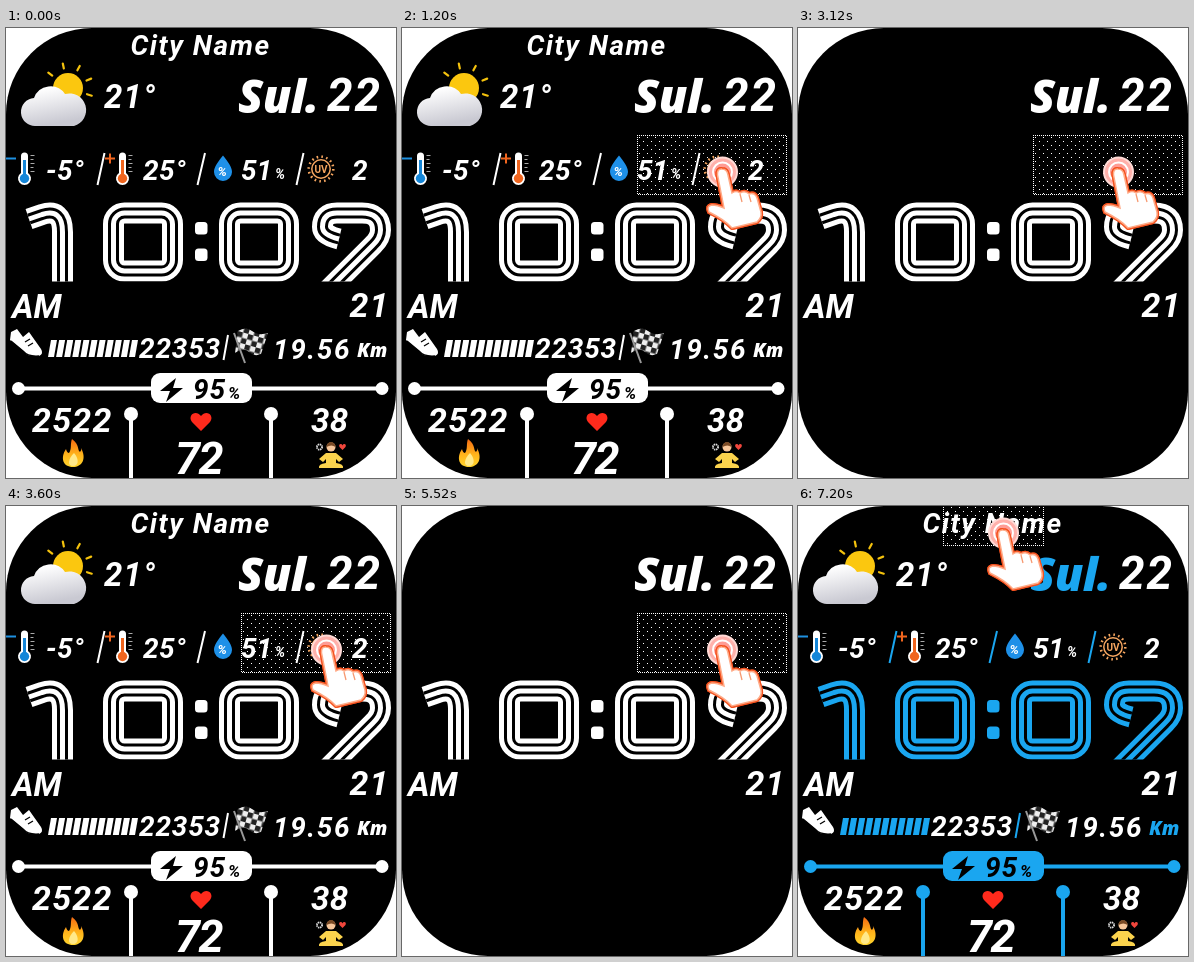
These frames come from a looping animation (390x450 px, 8 s). An HTML page:

```html
<!DOCTYPE html>
<html lang="en">
<head>
<meta charset="utf-8">
<title>Watch face</title>
<style>
  html, body { margin: 0; width: 100%; height: 100%; overflow: hidden; background: #fff; }
  svg { display: block; width: 390px; height: 450px; color: #fff; }
  text { font: italic 700 28px Roboto, sans-serif; fill: #fff; }
  .tint { fill: currentColor; }
  .dark { fill: #000; }
  .line { stroke: currentColor; fill: none; }
  .humanist { font-family: "Open Sans", sans-serif; font-weight: 800; }
</style>
</head>
<body>
<svg viewBox="0 0 390 450">
  <defs>
    <linearGradient id="cloud" x2=".3" y2="1">
      <stop offset=".15" stop-color="#fff"/><stop offset="1" stop-color="#c9c9d2"/>
    </linearGradient>
    <linearGradient id="fire" x2="0" y2="1">
      <stop stop-color="#f56a12"/><stop offset=".55" stop-color="#ffb31a"/><stop offset="1" stop-color="#ffd52e"/>
    </linearGradient>
    <pattern id="dots" width="8" height="8" patternUnits="userSpaceOnUse">
      <path d="M1 1h1v1h-1zM5 5h1v1h-1z" fill="#fff"/>
    </pattern>
    <pattern id="check" width="12" height="12" patternUnits="userSpaceOnUse" patternTransform="translate(232 303) rotate(16) scale(.9)">
      <path d="M0 0h12v12H0z" fill="#eee"/><path d="M0 0h6v6H0zM6 6h6v6H6z" fill="#222"/>
    </pattern>
    <clipPath id="timeClip"><path d="M0 170H390V253.500H0z"/></clipPath>
    <path id="one" d="M23 191L36 186.500Q56.500 180 56.500 204V258"/>
    <rect id="zero" x="107.500" y="185" width="59" height="58" rx="11"/>
    <path id="nine" d="M333 211Q316.500 207 316.500 199Q316.500 185 331 185H356Q374.500 185 374.500 202Q374.500 210 367 217L321 263"/>
    <g id="thermometer">
      <path d="M15 128a3.500 3.500 0 0 1 7 0v17a6.500 6.500 0 1 1-7 0z" fill="#fff"/>
      <circle cx="18.500" cy="150.500" r="4.700"/><path d="M17 132h3v18h-3z"/>
      <path d="M24.500 127.500h4m-4 4h3m-3 4h4m-4 4h3m-3 4h4" stroke="#aaa" stroke-width="1"/>
    </g>
  </defs>

  <rect width="390" height="450" rx="86"/>

  <g id="clock">
    <g id="time" clip-path="url(#timeClip)" fill="none"></g>
    <g class="tint">
      <rect x="189" y="194" width="12.500" height="12.500" rx="3.500"/>
      <rect x="189" y="220.500" width="12.500" height="12.500" rx="3.500"/>
    </g>
  </g>

  <g id="info">
    <g id="weather">
      <g id="rays" stroke="#f4c20d" stroke-width="2.200" stroke-linecap="round"></g>
      <circle cx="62" cy="60" r="15" fill="#fbc70f"/>
      <path d="M30 98a14 14 0 0 1-2-28A17.500 17.500 0 0 1 59 66A16.500 16.500 0 1 1 68 98Z" fill="url(#cloud)"/>
    </g>

    <use href="#thermometer" fill="#1486d8"/>
    <use href="#thermometer" x="98" fill="#f0651e"/>
    <path d="M0 130.500h10" stroke="#1e90e0" stroke-width="2"/>
    <path d="M99 130.500h10m-5-5v10" stroke="#f0651e" stroke-width="2"/>
    <path d="M217 127.500C222 134 226 139 226 144a9 9 0 0 1-18 0C208 139 212 134 217 127.500Z" fill="#1e90e8"/>
    <text x="211.500" y="148" style="font-size:13px">%</text>

    <g stroke="#f6a660" fill="none" stroke-width="1.500">
      <circle cx="315" cy="141" r="9.200"/>
      <circle cx="315" cy="141" r="12.300" stroke-width="2.500" stroke-dasharray="1.600 3.230"/>
    </g>
    <text x="315" y="145" text-anchor="middle" style="font:700 10px Roboto,sans-serif;fill:#f6a660">UV</text>

    <path class="line" stroke-width="2" d="M98.500 125L91.500 157M199 125L191.500 157M297.500 125L290.500 157M222 307L217.500 332"/>

    <path d="M5 304L11 301L17 309L23 304L35 321Q38 326 33 328H25Q20 327 16 322L4 312Z" fill="#fff"/>
    <path d="M5 313L17 323Q22 329 33 328M19 314l5-3m-2 7l5-3" stroke="#000" stroke-width="1.300" fill="none"/>
    <g id="steps" class="tint"></g>
    <path d="M232 303Q240 298 246 303T262 305L255 326Q248 329 243 324T229 325Z" fill="url(#check)"/>
    <path d="M228 305L239 335" stroke="#999" stroke-width="2"/>

    <path class="line" stroke-width="4" d="M13 360.500H376M125 386V450M265 386V450"/>
    <g class="tint">
      <circle cx="12.500" cy="360.500" r="6.500"/><circle cx="376" cy="360.500" r="6.500"/>
      <circle cx="125" cy="386" r="7"/><circle cx="265" cy="386" r="7"/>
      <rect x="145" y="345" width="101" height="30" rx="9"/>
    </g>
    <path d="M170 350L154 363H164L160 374L177 360H167Z"/>

    <path d="M195 403L186 394C181 387 190 381 195 388C200 381 209 387 204 394Z" fill="#ff2a1c"/>
    <path d="M66 411C74 417 71 422 74 424Q76 422 75 420C81 431 76 439 67 439C57 439 54 430 60 421Q61 425 63 425C66 421 64 416 66 411Z" fill="url(#fire)"/>
    <path d="M68 425C74 432 72 438 67 438C61 438 62 431 68 425Z" fill="#ffe98a"/>

    <g fill="#fbd34d">
      <circle cx="325" cy="419" r="4.500" fill="#f7c69a"/>
      <path d="M320.500 419a4.500 5 0 0 1 9 0q-4-3-9 0z" fill="#7a4a25"/>
      <path d="M320 425H330L337 431L333 434L330 431V435Q338 436 337 440H313Q312 436 320 435V431L317 434L313 431Z"/>
      <circle cx="313.500" cy="419" r="2.600" fill="none" stroke="#ddd" stroke-width="1.800" stroke-dasharray="1.400 .640"/>
      <path d="M336.500 422l-3-3c-1.500-3 2-4 3-1.500c1-2.500 4.500-1.500 3 1.500z" fill="#f0463c"/>
    </g>
  </g>

  <g id="touch">
    <rect id="box" fill="url(#dots)" stroke="#fff" stroke-dasharray="1 1" stroke-dashoffset=".5" shape-rendering="crispEdges"/>
    <g id="hand">
      <circle cx="320.500" cy="144" r="14.500" fill="#ffb0aa" stroke="#ffdad6" stroke-width="2"/>
      <circle cx="320.500" cy="144" r="9.500" fill="#ff9c94" stroke="#fff" stroke-width="2"/>
      <path id="palm" d="M315.500 147Q315 140.500 320 141Q325 141 326 147L330 165Q334 162 338 165Q343 162 347 166Q353 164 355 170L359 184Q360 190 355 194L330 200Q323 192 307 184Q304 178 310 177Q315 177 322 180Z"
        fill="#fff" stroke="#f4511e" stroke-width="4" stroke-linejoin="round"/>
      <use href="#palm"/>
      <path d="M315.500 147Q315 140.500 320 141Q325 141 326 147L330 165Q334 162 338 165Q343 162 347 166Q353 164 355 170L359 184Q360 190 355 194L330 200Q323 192 307 184Q304 178 310 177Q315 177 322 180Z"
        fill="#fff" stroke="#ffab88" stroke-width="1.500"/>
      <path d="M338 166l2 8m7-7l2 7" stroke="#f79a72" stroke-width="1.300"/>
    </g>
  </g>
</svg>
<script>
const $ = id => document.getElementById(id);
const add = (id, markup) => $(id).insertAdjacentHTML('beforeend', markup);

function label(group, text, x, y, size, spacing = 0, style = '') {
  add(group, `<text x="${x}" y="${y}" class="${style}" style="font-size:${size}px;letter-spacing:${spacing}px">${text}</text>`);
}

// Three parallel lines: wide band, black core, thin centre.
for (const [glyph, x] of [['one', 0], ['zero', 0], ['zero', 116], ['nine', 0]])
  for (const [width, colour] of [[21, 'currentColor'], [11, '#000'], [5, 'currentColor']])
    add('time', `<use href="#${glyph}" x="${x}" stroke="${colour}" stroke-width="${width}"/>`);

for (let i = 0; i < 5; i++)
  add('rays', `<path d="M82 60h5" transform="rotate(${-142 + 40 * i} 62 60)"/>`);
for (let i = 0; i < 11; i++)
  add('steps', `<path d="M${45 + 8.1 * i} 312h6l-3 17h-6z"/>`);

label('clock', 'Sul.', 232, 85, 46, -0.5, 'tint humanist');
label('clock', '22', 321, 83, 46, 2);
label('clock', 'AM', 6, 290, 33);
label('clock', '21', 343.5, 289, 34, 1);

label('info', 'City Name', 124.5, 27, 28, 1.5);
label('info', '21°', 98, 80, 33, 1);
label('info', '-5°', 40, 152, 28, 0.5);
label('info', '25°', 137, 152, 28, 0.5);
label('info', '51', 235, 152, 28);
label('info', '%', 269, 151, 14);
label('info', '2', 346, 152, 28);
label('info', '22353', 133, 330, 28, 0.8);
label('info', '19.56', 267, 331, 28, 1.6);
label('info', 'Km', 351, 329, 19, 0, 'tint humanist');
label('info', '95', 187, 371, 28, 0.8, 'dark');
label('info', '%', 222, 371, 17, 0, 'dark');
label('info', '2522', 26, 404, 34, 1.2);
label('info', '72', 169, 446, 45, -1.5);
label('info', '38', 305, 404, 33, 0.5);

const STEP = 1200, LOOP = 8000;
const tints = { 5: '#20cf35', 6: '#1aa6f0' };
let shown = -1;

function show(phase) {
  const top = phase >= 5;
  document.querySelector('svg').style.color = tints[phase] || '#fff';
  $('info').style.display = phase === 2 || phase === 4 ? 'none' : '';
  $('touch').style.display = phase ? '' : 'none';
  $('hand').setAttribute('transform', top ? 'translate(-115 -117)' : '');
  const [x, y, width, height] = top ? [145.5, -0.5, 100, 40] : [235.5, 107.5, 149, 59];
  for (const [name, value] of Object.entries({ x, y, width, height })) $('box').setAttribute(name, value);
}

function frame(now) {
  const phase = Math.floor(now % LOOP / STEP);
  if (phase !== shown) show(shown = phase);
  requestAnimationFrame(frame);
}
frame(performance.now());
</script>
</body>
</html>
```
